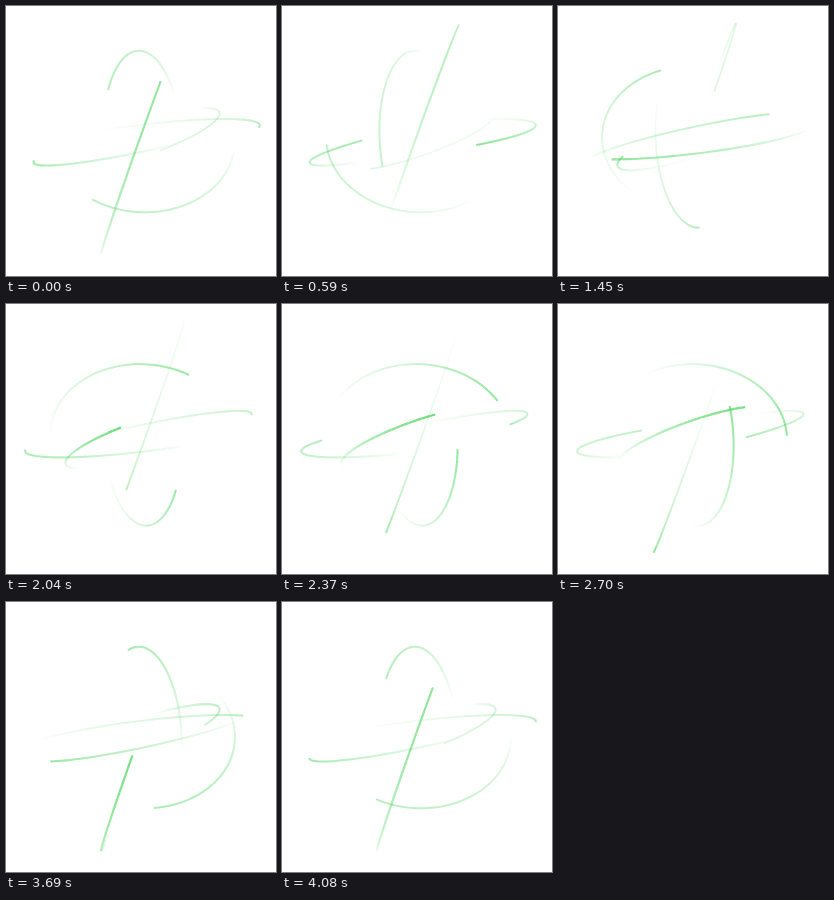
An HTML page that plays this animation: 270x270 px, repeating every 4.15 s.

```html
<!DOCTYPE html>
<html lang="en">
<head>
<meta charset="utf-8">
<title>Orbit trails</title>
<style>
  html, body { margin: 0; width: 100%; height: 100%; overflow: hidden; background: #fff; }
  svg { display: block; width: 100vw; height: 100vh; }
</style>
</head>
<body>
<svg id="stage" viewBox="0 0 270 270" fill="none" stroke="#4fd65f"></svg>
<script>
const LOOP = 4150, STEPS = 63, SEGMENTS = 36;
const CENTER = [136.5, 133.2];
const RAD = Math.PI / 180;
const SPAN = 118 * RAD;

// u, v: conjugate radii of each ellipse; near: angle closest to the viewer.
const orbits = [
  { u: [-50.4, 60.2], v: [-77.5, -41.5], near: 215, depth: 0.12 },
  { u: [18.2, -58], v: [37.4, -100.5], near: 290, depth: 0.3 },
  { u: [-34.5, -49], v: [-18.5, 73.7], near: 235, depth: 0.14 },
  { u: [-108.2, 21.3], v: [14.6, -15.5], near: 330, depth: 0.1 },
  { u: [116, -11.5], v: [-18.7, 16.6], near: 85, depth: 0.16 },
  { u: [17.8, 11.2], v: [-75.2, 29], near: 195, depth: 0.35 }
];

const stage = document.getElementById("stage");
for (const orbit of orbits) {
  orbit.lines = Array.from({ length: SEGMENTS }, () =>
    stage.appendChild(document.createElementNS("http://www.w3.org/2000/svg", "line")));
}

function pointOn({ u, v }, angle) {
  const c = Math.cos(angle), s = Math.sin(angle);
  return CENTER.map((m, i) => m + u[i] * c + v[i] * s);
}

function drawTrail(orbit, head) {
  let from = pointOn(orbit, head);
  orbit.lines.forEach((line, k) => {
    const to = pointOn(orbit, head - SPAN * (k + 1) / SEGMENTS);
    const mid = head - SPAN * (k + 0.5) / SEGMENTS;
    const fade = (1 - (k + 0.5) / SEGMENTS) ** 0.8;
    const light = 0.5 + orbit.depth * Math.cos(mid - orbit.near * RAD);
    const attributes = {
      x1: from[0], y1: from[1], x2: to[0], y2: to[1],
      "stroke-width": 1.5 + 0.9 * light,
      "stroke-opacity": light * fade
    };
    for (const name in attributes) line.setAttribute(name, attributes[name].toFixed(3));
    from = to;
  });
}

function render(ms) {
  // Steps land on a 10 ms clock.
  const time = Math.floor((ms % LOOP) / 10) * 10;
  const step = Math.floor((time + 5) * STEPS / LOOP) % STEPS;
  const head = step / STEPS * 2 * Math.PI;
  orbits.forEach(orbit => drawTrail(orbit, head));
}

const start = performance.now();
function tick() {
  render(performance.now() - start);
  requestAnimationFrame(tick);
}
tick();
</script>
</body>
</html>
```
